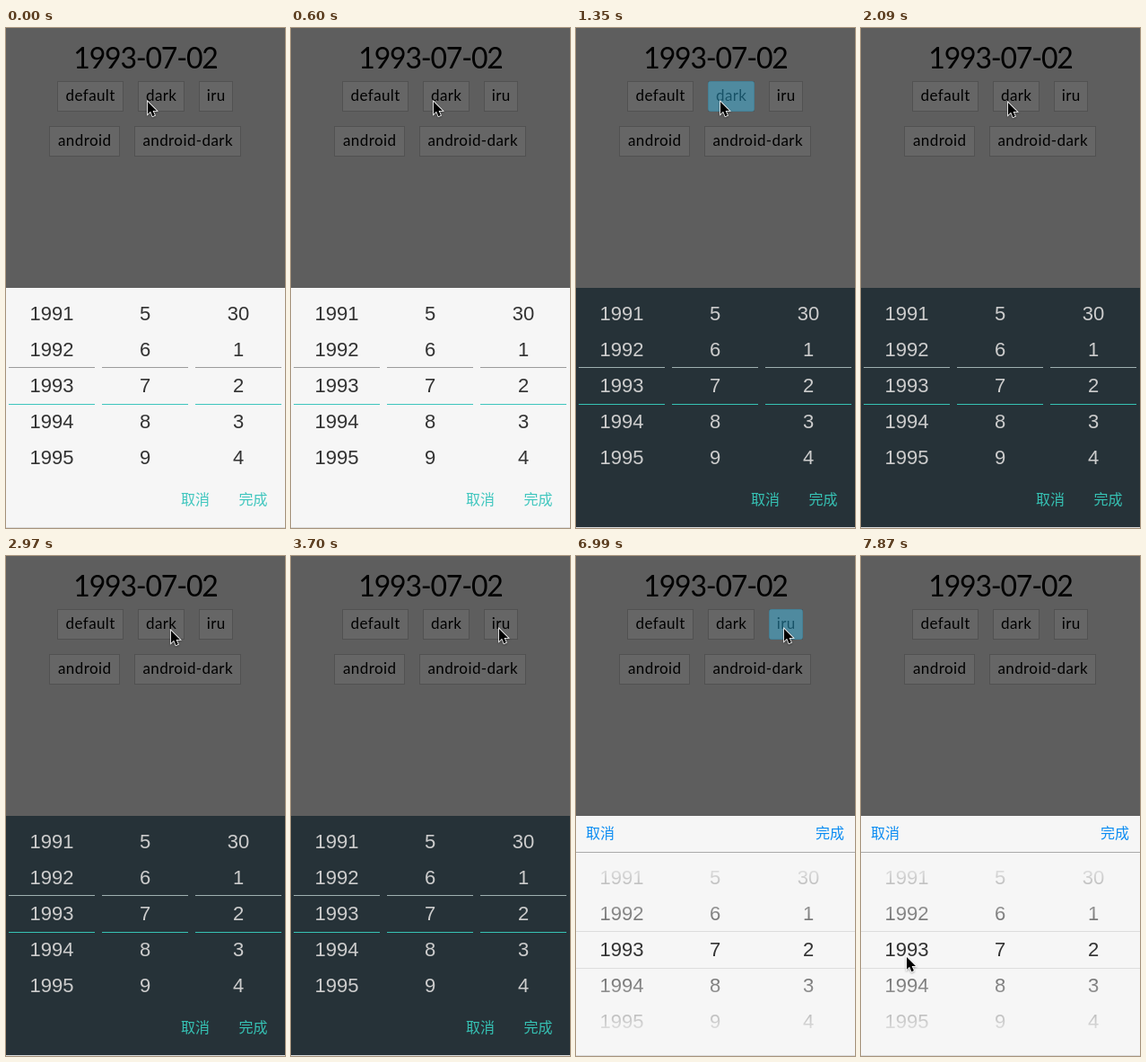
Animation, 311 px wide and 556 px high, one loop 8000 ms. Source, as an HTML page:

```html
<!DOCTYPE html>
<html lang="zh">
<head>
<meta charset="utf-8">
<title>Date picker themes</title>
<style>
html, body { margin: 0; width: 100%; height: 100%; overflow: hidden; background: #ececec; }
svg { display: block; width: 100vw; height: 100vh; }
text { text-anchor: middle; }
.title { font: 32px Lato, sans-serif; letter-spacing: -1.2px; }
.label { font: 17px Lato, sans-serif; letter-spacing: .4px; }
.num { font: 22px "Liberation Sans", Arial, sans-serif; }
.action { font: 16px "Noto Sans CJK SC", "Noto Sans CJK", sans-serif; }
#cursor { filter: drop-shadow(0 1px 1px rgba(0, 0, 0, .35)); }
</style>
</head>
<body>
<svg id="stage" viewBox="0 0 311 556">
  <defs>
    <linearGradient id="fade" x1="0" y1="0" x2="0" y2="1">
      <stop offset="0" stop-color="#f6f6f6"/>
      <stop offset=".07" stop-color="#f6f6f6"/>
      <stop offset="1" stop-color="#f6f6f6" stop-opacity=".24"/>
    </linearGradient>
  </defs>
  <g id="page"></g>
  <rect id="shade" width="311" height="555" fill="#000" opacity=".6"/>
  <rect id="tap" y="59" height="34" rx="3" fill="#33b5e5" opacity=".45"/>
  <g id="light"></g>
  <g id="dark"></g>
  <g id="wheel"></g>
  <rect y="555" width="311" height="1" fill="#dcdcdc"/>
  <path id="cursor" d="M1 1V14.8L4.1 11.8L6.4 17.2L8.9 16.1L6.6 10.9H11Z"
    fill="#000" stroke="#fff" stroke-width="1.6" paint-order="stroke"/>
</svg>
<script>
const LOOP = 8000;
const $ = id => document.getElementById(id);
const panels = ['light', 'dark', 'wheel'];
const columns = [
  [51, [1991, 1992, 1993, 1994, 1995]],
  [155, [5, 6, 7, 8, 9]],
  [259, [30, 1, 2, 3, 4]]
];

// time, x, y
const moves = [
  [0, 157, 81], [600, 158, 81], [1200, 160, 81], [2090, 163, 82],
  [2230, 166, 83], [2380, 166.5, 83], [2680, 168, 84], [2820, 182, 82],
  [2970, 183, 82], [3120, 194, 82], [3260, 207, 82], [3410, 221, 80],
  [3550, 226, 80], [3700, 231, 80], [7580, 230, 83], [7730, 122, 293],
  [7870, 50, 445]
];

// time, open panel, tapped button as [x, width]
const states = [
  [0, 'light'], [1200, ''], [1350, 'dark', [147, 52]], [1490, 'dark'],
  [6700, ''], [6990, 'wheel', [215, 38]], [7140, 'wheel']
];

function add(parent, tag, attrs, content = '') {
  const el = document.createElementNS('http://www.w3.org/2000/svg', tag);
  for (const key in attrs) el.setAttribute(key, attrs[key]);
  el.textContent = content;
  parent.append(el);
  return el;
}
const box = (parent, x, y, width, height, fill, more) =>
  add(parent, 'rect', { x, y, width, height, fill, ...more });
const write = (parent, kind, x, y, content, fill = '#000') =>
  add(parent, 'text', { class: kind, x, y, fill }, content);

function numbers(parent, top, fill) {
  for (const [x, values] of columns)
    values.forEach((v, i) => write(parent, 'num', x, top + 40 * i, v, fill));
}

function button(x, y, width, name) {
  box($('page'), x + .5, y + .5, width - 1, 33, '#fff', { stroke: '#ccc' });
  write($('page'), 'label', x + width / 2 + .2, y + 22, name);
}

function buildPage() {
  box($('page'), 0, 0, 311, 556, '#ececec');
  write($('page'), 'title', 155.5, 45, '1993-07-02');
  button(57, 59, 74, 'default');
  button(147, 59, 52, 'dark');
  button(215, 59, 38, 'iru');
  button(48, 109, 79, 'android');
  button(143, 109, 119, 'android-dark');
}

function buildFlat(g, back, ink, rule, accent) {
  box(g, 0, 289, 311, 266, back);
  numbers(g, 325, ink);
  for (const [x] of columns) {
    box(g, x - 48, 377, 96, 1, rule);
    box(g, x - 48, 418, 96, 1, accent);
  }
  write(g, 'action', 211, 530, '取消', accent);
  write(g, 'action', 275.5, 530, '完成', accent);
}

function buildWheel(g) {
  box(g, 0, 289, 311, 266, '#f6f6f6');
  numbers(g, 365, '#333');
  box(g, 0, 330, 311, 87, 'url(#fade)');
  box(g, 0, 459, 311, 87, 'url(#fade)', { transform: 'rotate(180 155.5 502.5)' });
  box(g, 0, 329, 311, 1, '#aaa');
  box(g, 0, 417, 311, 1, '#ddd');
  box(g, 0, 458, 311, 1, '#ddd');
  write(g, 'action', 27, 314, '取消', '#0b8cf2');
  write(g, 'action', 283, 314, '完成', '#0b8cf2');
}

buildPage();
buildFlat($('light'), '#f6f6f6', '#333', '#9b9b9b', '#3fc6be');
buildFlat($('dark'), '#263238', '#ccc', '#9fb0b0', '#36c2b4');
buildWheel($('wheel'));

const show = (id, on) => $(id).setAttribute('visibility', on ? 'visible' : 'hidden');
const at = (table, t) => table.findLast(row => row[0] <= t);

function draw(now) {
  const t = now % LOOP;
  const [, x, y] = at(moves, t);
  const [, open, tap] = at(states, t);
  $('cursor').setAttribute('transform', `translate(${x} ${y})`);
  for (const id of panels) show(id, id === open);
  show('shade', open);
  show('tap', tap);
  if (tap) {
    $('tap').setAttribute('x', tap[0]);
    $('tap').setAttribute('width', tap[1]);
  }
}

let start;
function tick(now) {
  start ??= now;
  draw(now - start);
  requestAnimationFrame(tick);
}
draw(0);
requestAnimationFrame(tick);
</script>
</body>
</html>
```
